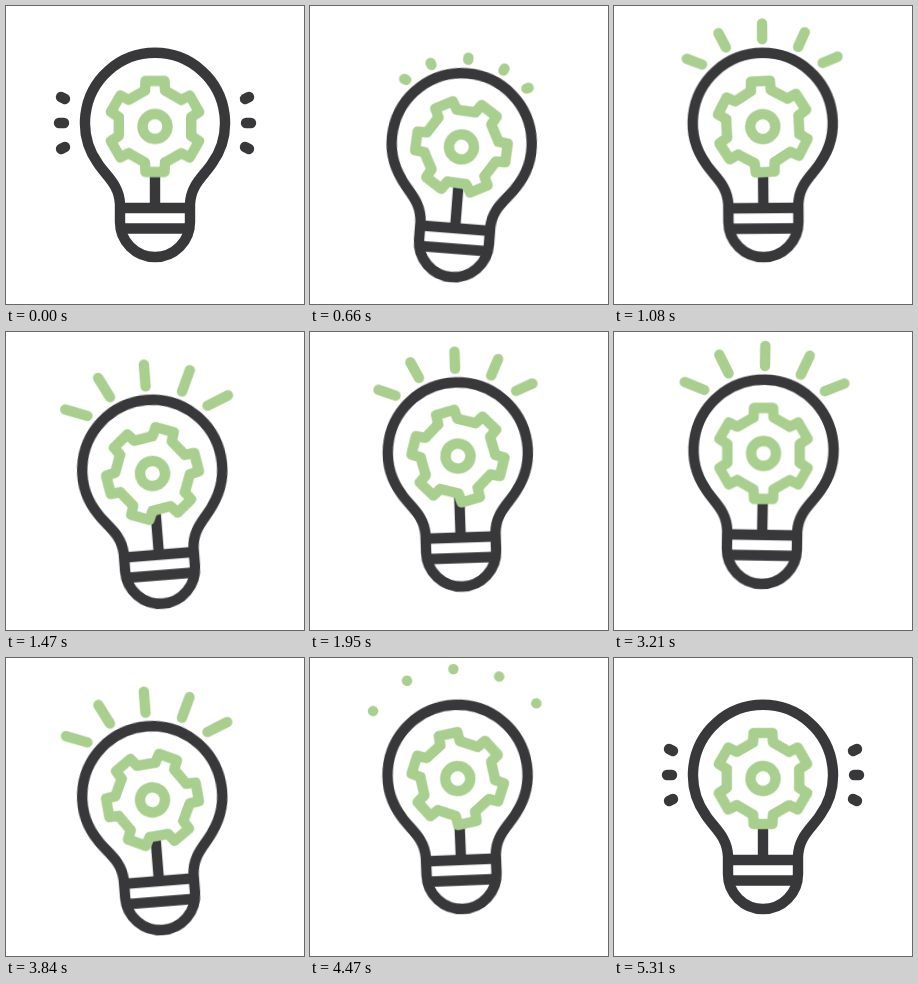
An HTML page for the animation above (5.4 s loop, 298 by 298 pixels).

```html
<!DOCTYPE html>
<html lang="en">
<head>
<meta charset="utf-8">
<title>Bouncing idea bulb</title>
<style>
  :root { --dark: #38383a; --green: #a9cf8f; --swing: cubic-bezier(.37, 0, .63, 1); }
  html, body { margin: 0; width: 100%; height: 100%; overflow: hidden; background: #fff; }
  svg { display: block; width: 100%; height: 100%; }
  svg { fill: none; stroke: var(--dark); stroke-width: 10.4; stroke-linejoin: round; }
  .green { stroke: var(--green); }
  .marks, .rays, .gear { stroke-linecap: round; }
  .gear { fill: #fff; }

  .bounce, .tilt, .gear, .marks path, .rays path { animation: 5400ms var(--swing) infinite; }
  .bounce { animation-name: bounce; }
  .tilt { animation-name: tilt; transform-origin: 149px 152px; }
  .gear { animation-name: spin; animation-timing-function: linear; }
  .marks path { animation-name: mark; }
  .rays path { animation-name: ray; }
  .marks { animation: mark-show 5400ms step-end infinite; }
  .rays { animation: ray-show 5400ms step-end infinite; }

  @keyframes bounce {
    0%, 19.63%, 39.07%, 60.93%, 82.59%, 100% { transform: translateY(0); }
    10.93%, 28.15%, 50%, 71.85% { transform: translateY(21.5px); }
  }
  @keyframes tilt {
    0%, 93.7%, 100% { transform: rotate(0deg); }
    10.93%, 50% { transform: rotate(4.6deg); }
    28.15%, 71.85% { transform: rotate(-4.6deg); }
  }
  @keyframes spin {
    0% { transform: rotate(0deg); }
    12.22% { transform: rotate(33deg); }
    27.22% { transform: rotate(80deg); }
    45% { transform: rotate(131deg); }
    59.44% { transform: rotate(179deg); }
    82.78% { transform: rotate(230deg); animation-timing-function: ease-out; }
    93.7%, 100% { transform: rotate(240deg); }
  }

  /* The dash is the visible part of each line, drawn from its inner end. */
  @keyframes mark {
    0%, 98.33%, 100% { stroke-dasharray: 100 300; stroke-dashoffset: 0; }
    11.11% { stroke-dasharray: 0 300; stroke-dashoffset: -100; }
    87.22% { stroke-dasharray: 0 300; stroke-dashoffset: 0; }
  }
  @keyframes ray {
    0%, 11.11% { stroke-dasharray: 0 300; stroke-dashoffset: 0; }
    16.67%, 27.78%, 38.89%, 50%, 61.11%, 72.22% { stroke-dasharray: 100 300; stroke-dashoffset: 0; }
    22.22%, 33.33%, 44.44%, 55.56%, 66.67% { stroke-dasharray: 55 300; stroke-dashoffset: 0; }
    83.33%, 100% { stroke-dasharray: 0 300; stroke-dashoffset: -100; }
  }
  @keyframes mark-show {
    0%, 87.22%, 100% { visibility: visible; }
    11.11% { visibility: hidden; }
  }
  @keyframes ray-show {
    0%, 83.89%, 100% { visibility: hidden; }
    11.11% { visibility: visible; }
  }
</style>
</head>
<body>
<svg viewBox="0 0 298 298">
  <defs>
    <path id="tooth" d="M-10-36L-9.5-45.5H9.5L10-36L26.2-26.7"/>
  </defs>

  <g class="marks">
    <path pathLength="100" d="M59 93L55 91"/>
    <path pathLength="100" d="M58 117H53"/>
    <path pathLength="100" d="M59 141L55 143"/>
    <path pathLength="100" d="M239 93L243 91"/>
    <path pathLength="100" d="M240 117H245"/>
    <path pathLength="100" d="M239 141L243 143"/>
  </g>

  <g class="bounce">
    <g class="tilt">
      <g class="rays green" transform="translate(149 117)">
        <path pathLength="100" d="M-60.3-59L-82-67.3"/>
        <path pathLength="100" d="M-36.3-75.9L-46.8-96.3"/>
        <path pathLength="100" d="M0-84V-106"/>
        <path pathLength="100" d="M35.9-75.9L45.5-96.8"/>
        <path pathLength="100" d="M60.3-59.8L81.6-68.5"/>
      </g>

      <path d="M149 156V202"/>
      <path d="M114 216V198C113 178 100 170 91.7 157A70 70 0 1 1 206.3 157C198 170 185 178 184 198V216A35 35 0 0 1 114 216Z"/>
      <path d="M114 202H184M114 222.5H184"/>

      <g transform="translate(149 120.5)">
        <g class="gear green">
          <circle r="36" stroke="none"/>
          <circle r="12.5"/>
          <use href="#tooth"/>
          <use href="#tooth" transform="rotate(60)"/>
          <use href="#tooth" transform="rotate(120)"/>
          <use href="#tooth" transform="rotate(180)"/>
          <use href="#tooth" transform="rotate(240)"/>
          <use href="#tooth" transform="rotate(300)"/>
        </g>
      </g>
    </g>
  </g>
</svg>
</body>
</html>
```
